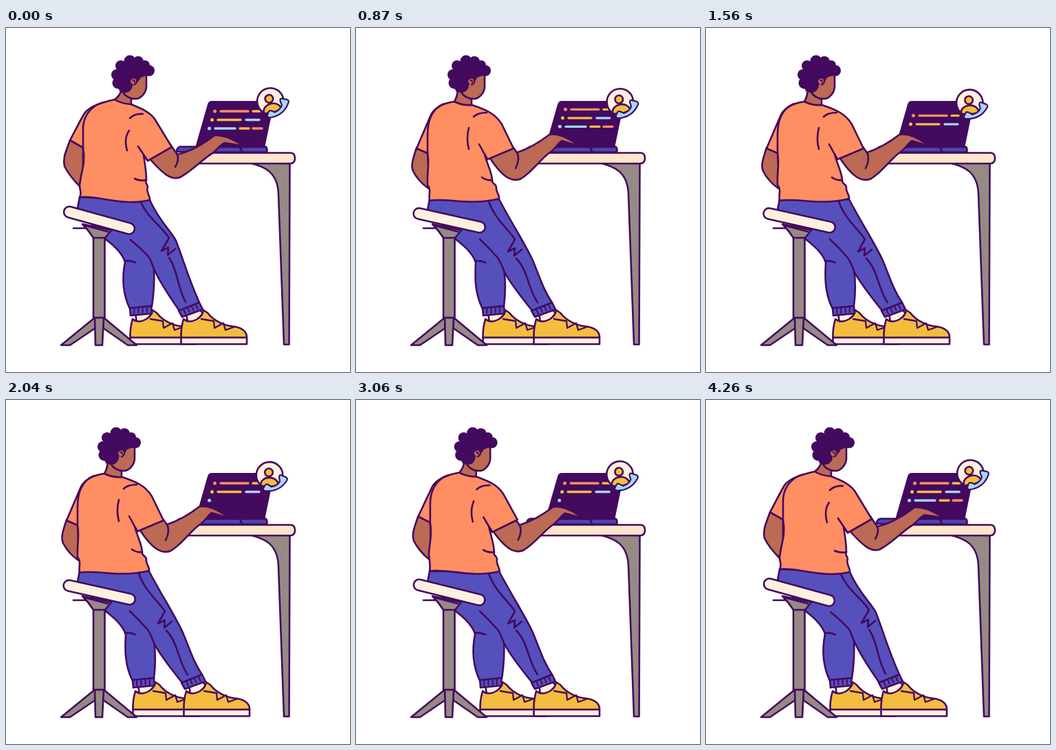
Write an HTML page with a canvas that moves like this. It is 500 px wide and 500 px high and loops after 4290 ms.

```html
<!DOCTYPE html>
<html lang="en">
<head>
<meta charset="utf-8">
<title>Working at a laptop</title>
<style>
html, body { margin: 0; width: 100%; height: 100%; overflow: hidden; background: #fff; }
canvas { display: block; width: 500px; height: 500px; }
</style>
</head>
<body>
<canvas id="stage" width="500" height="500"></canvas>
<script>
const g = document.getElementById('stage').getContext('2d');
const LOOP = 4290;
const PEN = 2.6;
const INK = '#430a5f', SHIRT = '#ff8e62', SKIN = '#bd6a54', JEANS = '#5650bd',
      YELLOW = '#f5bd3d', CREAM = '#fef0de', GRAY = '#968a85', SKY = '#a3d8f8', BASE = '#4a48b0';

const clamp = x => Math.max(0, Math.min(1, x));
const ease = x => x * x * (3 - 2 * x);
const span = (t, a, b) => clamp((t - a) / (b - a));
const lerp = (a, b, p) => a + (b - a) * p;

// Blend the numbers of two path strings that share the same commands
function blend(a, b, p) {
  if (p === 0) return a;
  const nums = b.match(/-?[\d.]+/g);
  let i = 0;
  return a.replace(/-?[\d.]+/g, n => lerp(+n, +nums[i++], p).toFixed(2));
}

function shape(fill, d, width = PEN) {
  const path = new Path2D(d);
  if (fill) { g.fillStyle = fill; g.fill(path); }
  g.strokeStyle = INK;
  g.lineWidth = width;
  g.stroke(path);
}
const line = (d, width) => shape(null, d, width);

function disc(x, y, r, fill, outlined) {
  g.beginPath();
  g.arc(x, y, r, 0, Math.PI * 2);
  g.fillStyle = fill;
  g.fill();
  if (outlined) { g.lineWidth = PEN; g.strokeStyle = INK; g.stroke(); }
}

function shifted(dx, dy, draw) {
  g.save();
  g.translate(dx, dy);
  draw();
  g.restore();
}

function desk() {
  shape(GRAY, 'M354 196C374 201 395 208 396 242L404 460H411.5L412.5 197Z');
  shape('#fde6cb', 'M264 181.5H414Q420 182 420 189Q420 197 413 197H264Q258 196 258 189Q258 182 264 181.5Z');
}

const SCREEN = 'M299 107H385Q389 107 388 111L375 174H276L294 111Q295 107 299 107Z';
// Each row: dot x, y, dot colour, then bars as start, end, colour
const ROWS = [
  [303.5, 121, SHIRT, [[312, 352, SHIRT], [359, 369, YELLOW]]],
  [299.5, 133.5, YELLOW, [[308, 341, YELLOW], [349, 368, SKY]]],
  [295.5, 146, SKY, [[304, 333, SKY], [340, 353, YELLOW], [359, 372, SHIRT]]]
];

function scroll(t) {
  if (t < 1180) return -52 * span(t, 780, 1180) ** 2;
  return 54 * (1 - span(t, 1180, 1760)) ** 2;
}

function code(t) {
  const y = scroll(t), fresh = t > 1180;
  g.save();
  g.clip(new Path2D(SCREEN));
  g.translate(-0.32 * y, y);
  ROWS.forEach(([x, cy, tint, bars], i) => {
    const last = fresh && i === 2;
    disc(x, cy, 2.5 * (last ? ease(span(t, 1650, 1850)) : 1), tint);
    const tip = last ? lerp(303, 373, span(t, 3520, 4180)) : 400;
    g.lineWidth = 3.3;
    for (const [a, b, color] of bars) {
      if (tip <= a) continue;
      g.strokeStyle = color;
      g.beginPath();
      g.moveTo(a, cy);
      g.lineTo(Math.min(b, tip), cy);
      g.stroke();
    }
  });
  g.restore();
}

function laptop(t) {
  shape(BASE, 'M253 172.5H377Q380 173 379 180H248Q248 174 253 172.5Z');
  shape(INK, SCREEN, 2);
  shape(BASE, 'M281 173H340Q341 178 345 180.5H281Z');
  shape(BASE, 'M341 173H377Q380 174 379 180.5H345Q341 179 341 173Z');
  code(t);
}

function badge(t) {
  const s = (1 - Math.cos(t / LOOP * Math.PI * 2)) / 2;
  g.save();
  g.translate(lerp(384.3, 383, s), lerp(106.5, 109.3, s));
  g.rotate(lerp(-0.23, 0, s));
  disc(0, 0, 19.2, CREAM, true);
  shape(YELLOW, 'M-13 15C-14 1 11 -1 13 14Q0 19 -13 15Z');
  disc(-1, -4, 5.8, YELLOW, true);
  shape(SKY, 'M17 0L24 3Q27 5 25 8C18 19 8 24 -6 23Q-10 22 -9 19L-6 14Q-4 12 0 15L3 17C8 16 13 13 15 9L14 3Q14 -1 17 0Z', 2.2);
  g.restore();
}

function shoe() {
  shape(CREAM, 'M262 413L280 408L290 419L264 430Z');
  shape(YELLOW, 'M254.5 450C254 437 256 430 258 423Q266 430 278 423Q286 418 287 410L293 414C302 426 318 433 332 434C344 436 350 442 350 450Z');
  shape(CREAM, 'M254.5 450H350V459.5H254.5Z');
  line('M284 423L302 426L303 436L316 429L319 439L333 434', 2.3);
}

function cuff() {
  shape(JEANS, 'M251 411L281 399L286 409L256 420Z');
  for (let i = 1; i < 5; i++) line(`M${252 + i * 5.9} ${411 - i * 2.3}l3 6.5`, 2);
}

function rearCuff() {
  shape(JEANS, 'M180 407L211 404L212 415L181 418Z');
  for (let i = 1; i < 5; i++) line(`M${180 + i * 6.2} ${408 - i * .6}v7.5`, 2);
}

function legs(p, rear, front) {
  shifted(4 * rear - 74, 0, shoe);
  shape(JEANS, blend(
    'M120 262L130 292L146 308C158 317 169 328 173 340C169 360 169 385 180 408L212 405C215 385 216 367 215 348L200 290Z',
    'M120 262L130 292L146 308C158 317 170 328 174 341C173 360 172 385 184 408L215 404C217 388 218 370 215 350L200 290Z', rear));
  line('M173 339Q180 337 188 341');
  shifted(4 * rear, 0, rearCuff);
  shifted(4 * front, 0, shoe);
  shape(JEANS, blend(
    'M181 308Q195 319 207 332C210 336 212 342 215 350C222 366 238 391 252 411L281 399C264 361 259 340 247 309C240 295 222 280 209 250L107 246L104 262L130 291',
    'M180 307Q194 320 206 334C209 338 212 345 215 353C222 368 240 391 257 412L285 399C273 382 267 362 257 338C246 314 227 285 208 249L107 249L104 264L130 291', front));
  line(blend('M196 253C205 275 225 287 237 305L226 324L236 319L235 330L246 321',
             'M193 252C201 276 219 290 231 307L221 325L231 320L230 331L241 322', front));
  line(blend('M237 334C249 350 250 381 261 398', 'M233 335C250 352 251 382 264 399', front));
  shifted(4 * front, 0, cuff);
}

function stool(p) {
  line('M98 291H130');
  shape(GRAY, 'M129 421L80 461H93L130 436Z');
  shape(GRAY, 'M142 421L190 461H177L141 436Z');
  shape(GRAY, 'M129 421H142L140 461H130Z');
  shape(GRAY, 'M127 304H143.5V421H127Z');
  shape(GRAY, 'M111 285L153 294L144 305H127Q120 294 111 285Z');
  line('M114 287L148 296');
  for (const [w, color] of [[18.5, INK], [13.3, CREAM]]) {
    g.lineWidth = w;
    g.strokeStyle = color;
    g.beginPath();
    g.moveTo(lerp(92, 91.5, p), lerp(267.5, 269.8, p));
    g.lineTo(lerp(179, 179.8, p), lerp(291.5, 289.5, p));
    g.stroke();
  }
}

function neck(p) {
  shape(SKIN, blend('M168 90Q165 99 158 104L170 113L182 111V98Z',
                    'M148 90Q147 100 143 107L156 114L168 112V98Z', p));
}

const CURLS = [[163, 80, 8.5], [161, 68, 8], [167, 55, 8], [180, 48, 8.5], [192, 49, 8],
  [202, 54, 7], [208, 62, 8], [180, 65, 17.5], [195, 62, 10], [173, 83, 11]];

function head(p) {
  shifted(-17 * p, 0, () => shape(SKIN,
    'M190 66L204 68V86C203 95 196 103 188 103C180 103 173 99 169 92L177 76Z'));
  shifted(-20 * p, 0, () => {
    for (const [x, y, r] of CURLS) disc(x, y, r, INK);
    shape(INK, 'M166 92L176 90L184 72L204 69L180 56L162 75Z', 1);
  });
  shifted(-18 * p, 0, () => {
    disc(186, 77, 5, SKIN);
    line('M182 74Q187 70 190 75Q191 81 186 82.5', 2.2);
    line('M184 76Q187 75 187 79', 1.8);
  });
}

function farArm(p) {
  shape(SKIN, blend('M93 163C88 178 82 188 85 201C90 211 98 221 108 231L112 208L112 172Z',
                    'M88 174C84 187 79 199 83 208C87 216 95 226 105 233L106 214L104 180Z', p));
}

function nearArm(p) {
  shape(SKIN, blend(
    'M238 168L249 184C270 179 289 167 303 156C315 155 326 160 340 168Q341 171 337 170L318 167C312 169 308 176 300 182C286 190 272 207 253 217C240 222 228 212 207 188Z',
    'M225 169L234 181C252 175 268 165 281 155C291 153 302 156 318 167Q320 170 316 169L299 164C294 167 290 175 283 180C268 190 258 208 240 219C226 225 212 216 194 188Z', p));
  line(blend('M249 184Q252 192 246 202', 'M234 181Q239 190 232 204', p));
}

function shirt(p) {
  shape(SHIRT, blend(
    'M158 104C140 108 122 113 114 124C107 136 100 150 93 163L112 174C116 195 110 207 108 222C104 235 112 236 107 246C130 242 170 260 209 250C210 245 203 238 206 231C206 226 201 226 204 221C204 208 202 198 200 185L206 193L241 173L216 132C208 121 196 117 182 111Q168 110 158 104Z',
    'M143 107C128 109 115 115 109 126C102 142 95 159 88 175L104 182C107 198 103 210 104 228C110 236 105 242 107 251C130 246 165 259 208 248C209 243 203 238 204 232C204 226 197 227 198 221C197 208 192 202 187 184L191 191L229 175L212 140C203 125 190 119 169 112Q155 113 143 107Z', p));
  line(blend('M142 108C122 113 111 130 112 150L112 174', 'M128 110C111 117 104 134 104 155L104 182', p));
  line(blend('M179 149Q171 160 176 178', 'M164 145Q160 161 164 176', p));
  line(blend('M180 131Q187 124 199 125', 'M171 129Q177 123 190 123', p));
  line(blend('M192 172L206 193', 'M179 169L191 191', p));
  line(blend('M187 219Q194 223 204 221', 'M183 217Q190 222 198 221', p));
}

function draw(t) {
  const move = (a, b, c, d) => ease(span(t, a, b)) - ease(span(t, c, d));
  const p = move(150, 770, 2750, 3390);
  const arm = move(90, 690, 2870, 3450);
  const front = move(150, 440, 3080, 3370);
  const rear = move(470, 770, 2750, 3030);
  g.fillStyle = '#fff';
  g.fillRect(0, 0, 500, 500);
  g.lineJoin = g.lineCap = 'round';
  desk();
  laptop(t);
  badge(t);
  legs(p, rear, front);
  stool(p);
  farArm(p);
  neck(p);
  head(p);
  nearArm(arm);
  shirt(p);
}

const start = performance.now();
function frame() {
  draw((performance.now() - start) % LOOP);
  requestAnimationFrame(frame);
}
frame();
</script>
</body>
</html>
```
